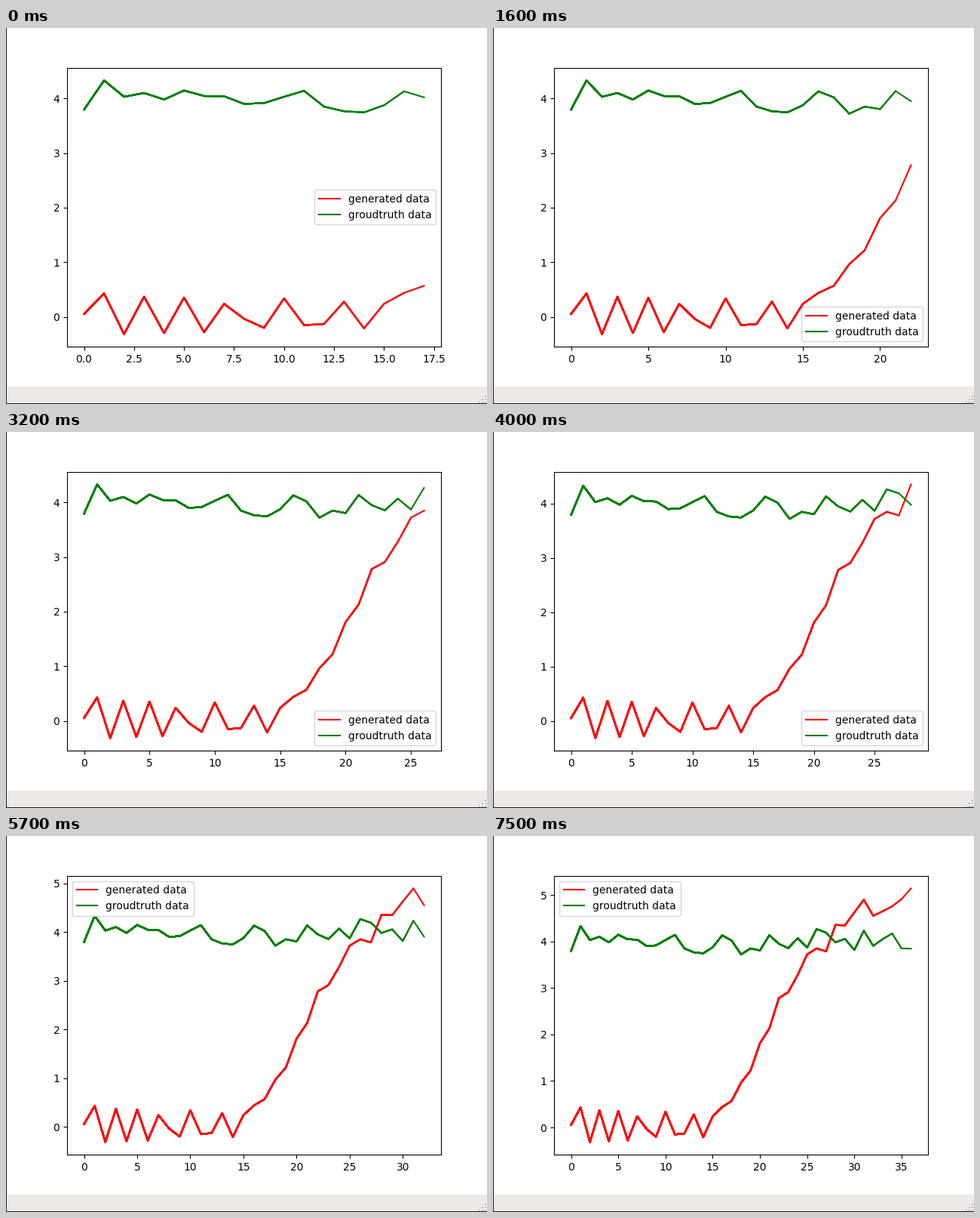
These frames come from a looping animation (638x498 px, 8 s). A matplotlib script:

```python
import matplotlib.pyplot as plt
from matplotlib.animation import FuncAnimation
from matplotlib.patches import Rectangle

W, H, DPI = 638, 498, 100
TICK = 100  # ms per frame
LOOP = 8000

GENERATED = [
    0.055, 0.43, -0.314, 0.37, -0.295, 0.355, -0.28, 0.24, -0.035, -0.2,
    0.34, -0.15, -0.13, 0.28, -0.21, 0.24, 0.44, 0.57, 0.965, 1.22,
    1.81, 2.13, 2.78, 2.91, 3.28, 3.72, 3.85, 3.785, 4.355, 4.345,
    4.625, 4.895, 4.55, 4.65, 4.755, 4.91, 5.14,
]
TRUTH = [
    3.795, 4.33, 4.03, 4.1, 3.98, 4.145, 4.045, 4.04, 3.9, 3.915,
    4.03, 4.14, 3.85, 3.765, 3.745, 3.875, 4.13, 4.02, 3.72, 3.85,
    3.805, 4.135, 3.95, 3.855, 4.07, 3.87, 4.265, 4.19, 3.98, 4.055,
    3.815, 4.23, 3.905, 4.05, 4.17, 3.85, 3.845,
]

# start time in ms -> index of the newest point
STEPS = {
    0: 17, 300: 19, 700: 20, 1100: 21, 1600: 22, 2000: 23, 2400: 24,
    3200: 26, 3600: 27, 4000: 28, 4500: 29, 4900: 30, 5700: 32,
    6100: 33, 6500: 34, 7300: 35, 7500: 36,
}

plt.rcParams["font.family"] = "DejaVu Sans"
plt.rcParams["toolbar"] = "None"
fig = plt.figure(figsize=(W / DPI, H / DPI), dpi=DPI, facecolor="white")
ax = fig.add_axes([81 / W, 75.8 / H, 496 / W, 369.6 / H])


def block(x, y, w, h, color):
    """Fill a pixel rectangle; y counts down from the top of the stage."""
    fig.add_artist(Rectangle((x, H - y - h), w, h, color=color, lw=0,
                             transform=None, antialiased=False))


def draw_window():
    block(0, 475, W, 23, "#edeae5")
    for row in range(3):
        for col in range(row + 1):
            x, y = 635 - 4 * col, 487 + 4 * row
            block(x + 1, y + 1, 2, 2, "#ffffff")
            block(x, y, 2, 2, "#bdb9b3")
    block(0, 0, 1, H, "#1c1c1c")
    block(0, H - 1, W, 1, "#1c1c1c")


def make_traces():
    """One pair of lines per step: each step is plotted over the earlier ones."""
    pairs = []
    for n in range(1, len(TRUTH)):
        xs = range(n + 1)
        red, = ax.plot(xs, GENERATED[:n + 1], color="red")
        green, = ax.plot(xs, TRUTH[:n + 1], color="green")
        pairs.append((red, green))
    return pairs


def newest_point(ms):
    return max(n for start, n in STEPS.items() if start <= ms)


def legend_place(n):
    if n < 20:
        return "center right"
    if n < 22:
        return "center left"
    return "lower right" if n < 31 else "upper left"


def padded(low, high):
    pad = 0.05 * (high - low)
    return low - pad, high + pad


def update(frame):
    n = newest_point(frame * TICK)
    for last, pair in enumerate(traces, start=1):
        for line in pair:
            line.set_visible(last <= n)
    shown = GENERATED[:n + 1] + TRUTH[:n + 1]
    ax.set_xlim(*padded(0, n))
    ax.set_ylim(*padded(min(shown), max(shown)))
    ax.legend(traces[0], ["generated data", "groudtruth data"],
              loc=legend_place(n))
    return []


draw_window()
traces = make_traces()
anim = FuncAnimation(fig, update, frames=LOOP // TICK, interval=TICK,
                     init_func=lambda: [], repeat=True, repeat_delay=0,
                     blit=False)
plt.show()
```
